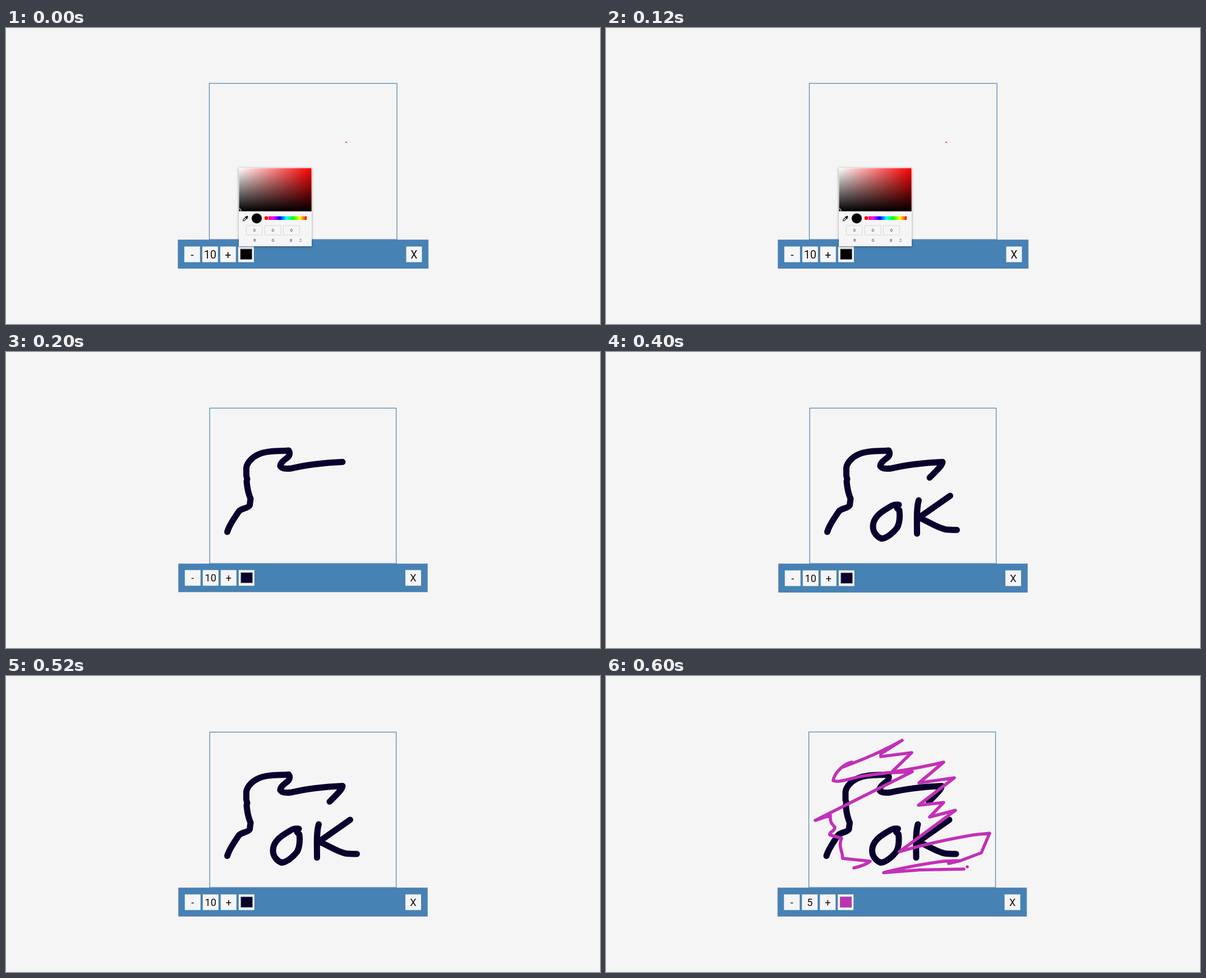
Write an HTML page that moves like this. It is 1059 px wide and 529 px high and loops after 0.8 s.

```html
<!DOCTYPE html>
<html lang="en">
<head>
<meta charset="utf-8">
<title>Drawing pad</title>
<style>
  html, body { margin: 0; width: 100%; height: 100%; overflow: hidden; background: #f5f5f5; }
  svg { display: block; width: 100%; height: 100%; font-family: Roboto, Arial, sans-serif; }
  text { text-anchor: middle; }
  .ink { fill: none; stroke-linecap: round; stroke-linejoin: round; }
</style>
</head>
<body>
<svg id="stage" viewBox="0 0 1059 529">
  <defs>
    <linearGradient id="tint"><stop stop-color="#fff"/><stop offset="1" stop-color="#f00"/></linearGradient>
    <linearGradient id="shade" x2="0" y2="1"><stop stop-color="#000" stop-opacity="0"/><stop offset="1"/></linearGradient>
    <linearGradient id="hue">
      <stop stop-color="#f00"/><stop offset=".167" stop-color="#f0f"/><stop offset=".333" stop-color="#00f"/>
      <stop offset=".5" stop-color="#0ff"/><stop offset=".667" stop-color="#0f0"/>
      <stop offset=".833" stop-color="#ff0"/><stop offset="1" stop-color="#f00"/>
    </linearGradient>
    <filter id="shadow" x="-10%" y="-10%" width="120%" height="120%">
      <feDropShadow dx="0" dy="1" stdDeviation="2" flood-opacity=".4"/>
    </filter>
    <clipPath id="field"><rect x="415.5" y="250.5" width="129" height="77"/></clipPath>
  </defs>
</svg>
<script>
const STEP = 200;
const PAPER = '#f5f5f5', STEEL = '#4682b4', NAVY = '#09002d', PINK = '#c230b7';

const wave = `M394.5 321.5C398 309 407 297 415 285C420 279 431 280 434.5 274L436 262
  C432 253 430 243 429 231L430 227L428.5 221V207C430 196 441 187 450 183
  C465 176 485 177.5 504 176C507.5 181 505 187 500 190C495 194 489 198 489 204
  C491 209 501 209 509 208C530 203 565 198 600 196.5`;
const hook = 'M600 196.5C599 204 589 212 577 224.5';
const letterO = `M522 273C514 272 510 274 504 278C490 286 476 296 476 312
  C476 323 484 331 491 333.5C501 333 513 322 519 314C524 305 524 292 523 283L519 279`;
const letterK = `M557.5 265C553 280 554.5 303 554.5 324.5M613.5 257L558 296
  C575 303 590 314 605 317C612 318 619 318 625.5 318`;

const scribble = `M419 164C455 150 485 139 528 115L490 139V144L545 137L508 173L546 171L373 258L400 249
  C399 260 402 264 408 270C409 277 397 279 399 284L420 290C415 300 419 310 421 318L422 326L471 331
  C465 336 455 340 442 343`;
const zigzag = `M438 154C425 156 407 173 405 187C418 192 440 180 470 177C520 171 560 164 602 154
  L558 191L621 182L557 231L602 226L577 252L623 240L523 314C570 300 620 290 655 284L684 281L669 316
  L632 330L611 335L632 330L602 331C565 336 527 343 495 351.5L560 346.5L638 345M644 341h.01`;

const rect = (x, y, w, h, fill, extra = '') =>
  `<rect x="${x}" y="${y}" width="${w}" height="${h}" fill="${fill}" ${extra}/>`;
const label = (x, y, size, str, fill = '#111') =>
  `<text x="${x}" y="${y}" font-size="${size}" fill="${fill}">${str}</text>`;
const ink = (d, color, width, dx = 0) =>
  `<path class="ink" d="${d}" stroke="${color}" stroke-width="${width}" transform="translate(${dx})"/>`;

function pad({ left, right, top, bottom, box, size, brush, color }) {
  const y = bottom - 39.5;
  const button = (x, str) => rect(x, y, 28, 28, PAPER) + label(x + 14, y + 14 + size * .36, size, str);
  const first = left + 11.5;
  return rect(box[0], top, box[1] - box[0], 378 - top, 'none', `stroke="${STEEL}" stroke-width="1.2"`)
    + rect(left + .5, 378.8, right - left - 1, bottom - 379.3, STEEL, 'stroke="#5579b9"')
    + button(first, '-') + button(first + 32, brush) + button(first + 64, '+')
    + rect(first + 96, y, 28, 28, PAPER)
    + rect(first + 100, y + 4.5, 20.5, 18.5, color, 'stroke="#767676" stroke-width=".8"')
    + button(right - 39.7, 'X');
}

function picker() {
  const channels = ['R', 'G', 'B'].map((name, i) => {
    const x = 428.5 + i * 33;
    return rect(x, 353, 28.5, 17, PAPER, 'rx="1" stroke="#d3d3d3" stroke-width=".9"')
      + label(x + 14.3, 364, 7.5, '0', '#333') + label(x + 15 - i * .7, 382, 7, name, '#333');
  }).join('');
  return rect(415, 250, 130, 140, PAPER, 'filter="url(#shadow)"')
    + rect(415.5, 250.5, 129, 77, 'url(#tint)') + rect(415.5, 250.5, 129, 77, 'url(#shade)')
    + '<circle cx="416" cy="326" r="3" fill="none" stroke="#fff" clip-path="url(#field)"/>'
    + `<g transform="translate(427 340.3) rotate(45)">
        <path d="M-1.4 -1V4.2L0 6L1.4 4.2V-1" fill="${PAPER}" stroke="#111" stroke-width="1.1"/>
        <path d="M-1.6 -5.5h3.2v3h1.2v1.6h-5.6v-1.6h1.2z" fill="#111"/></g>`
    + '<circle cx="447" cy="340.2" r="9"/>'
    + rect(464, 336.5, 72, 6.5, 'url(#hue)')
    + '<circle cx="464" cy="339.7" r="4" fill="#f00" stroke="#fff"/>'
    + channels
    + '<path d="M523.5 378.6l1.7-1.7l1.7 1.7M523.5 380.4l1.7 1.7l1.7-1.7" fill="none" stroke="#333" stroke-width=".8"/>';
}

const base = { left: 307.3, right: 751.7, top: 100.3, bottom: 429.5, box: [363.2, 695.7], size: 18.2, brush: 10, color: NAVY };
const word = hook + letterO + letterK;

const scenes = [
  pad({ ...base, left: 306.4, right: 753.2, top: 99, bottom: 430, box: [362.5, 697], size: 19.6, color: '#000' })
    + picker() + '<circle cx="606.5" cy="204.3" r="1.2" fill="#e22"/>',
  pad({ ...base, bottom: 429.2 }) + ink(wave, NAVY, 11),
  pad({ ...base, bottom: 429.8 }) + ink(wave + word, NAVY, 11),
  pad({ ...base, left: 305.8, right: 750.3, top: 100, bottom: 429.8, box: [361.6, 694.5], brush: 5, color: PINK })
    + ink(wave + word, NAVY, 11, -1.5) + ink(scribble + zigzag, PINK, 5.6)
];

const stage = document.getElementById('stage');
stage.insertAdjacentHTML('beforeend', scenes.map(s => `<g class="scene" visibility="hidden">${s}</g>`).join(''));
const groups = [...stage.querySelectorAll('.scene')];
const start = performance.now();

function draw(now) {
  const current = Math.floor(Math.max(0, now - start) / STEP) % groups.length;
  groups.forEach((g, i) => g.setAttribute('visibility', i === current ? 'visible' : 'hidden'));
  requestAnimationFrame(draw);
}
draw(start);
</script>
</body>
</html>
```
